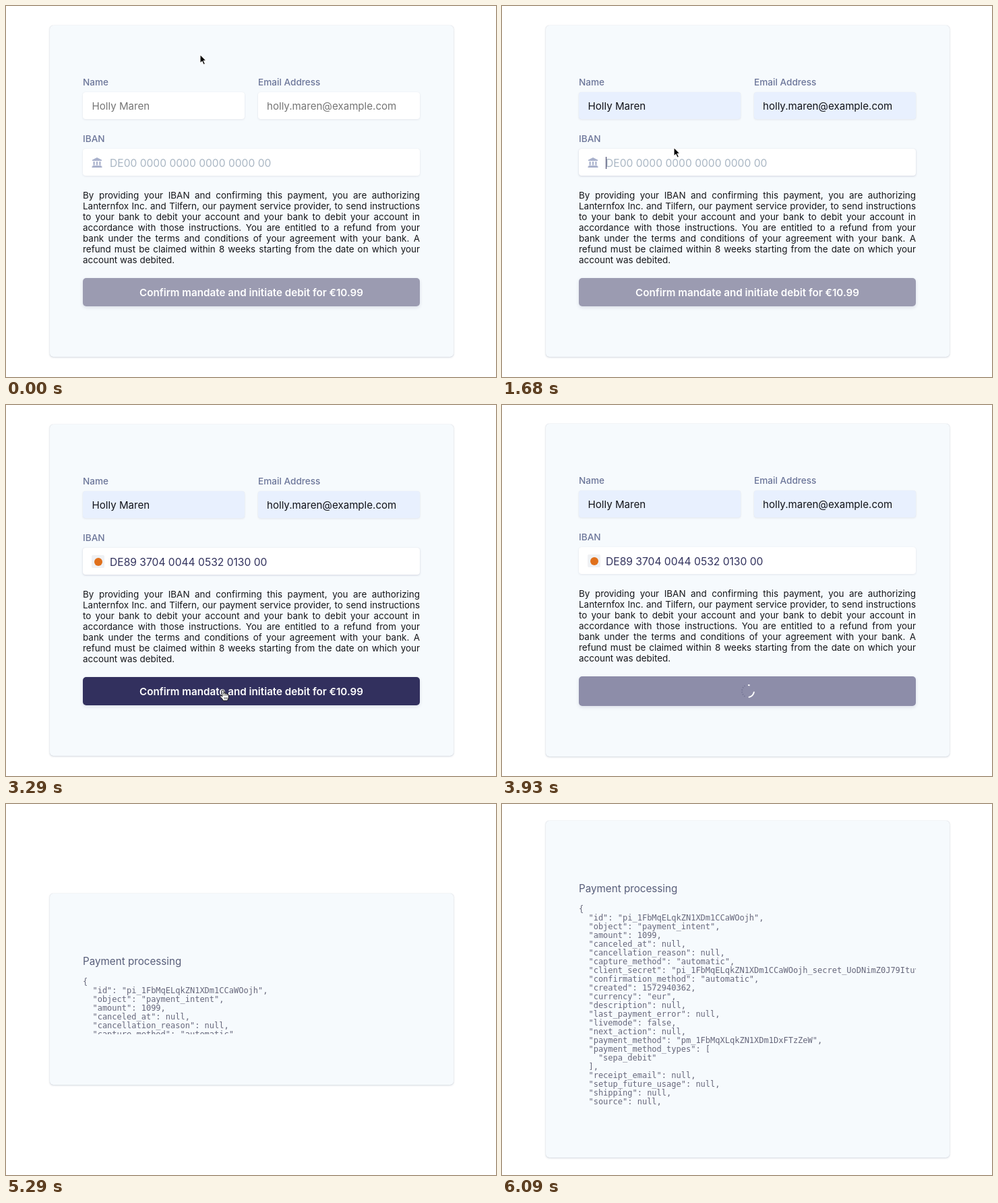
Recreate the animation shown at these times as an HTML page. Size 727 by 551 pixels, loop 8.75 s.

```html
<!DOCTYPE html>
<html lang="en">
<head>
<meta charset="utf-8">
<title>Direct debit form</title>
<style>
html, body { margin: 0; width: 100%; height: 100%; overflow: hidden; background: #fff; }
body { position: relative; font-family: Inter, "Open Sans", sans-serif; }
div, svg { position: absolute; }
.card { left: 65px; width: 599px; background: #f6fafd; border-radius: 5px;
  box-shadow: 0 0 1px rgba(60,80,110,.28), 0 1px 3px rgba(60,80,110,.2); }
.text { line-height: 20px; white-space: nowrap; }
.label { font-size: 13.6px; font-weight: 500; color: #6b7599; }
.value { font-size: 15.1px; }
.iban { font-size: 15.6px; }
.field { height: 40px; background: #fff; border-radius: 4px;
  box-shadow: 0 1px 3px rgba(50,50,93,.09), 0 0 1px rgba(50,50,93,.08); }
.legal { left: 114px; width: 500px; font-size: 13.45px; color: #15161a;
  text-align: justify; text-align-last: justify; }
.legal.last { text-align-last: left; }
#button { left: 114px; width: 500px; border-radius: 5px; box-shadow: 0 2px 5px rgba(50,50,93,.13); }
#pay { left: 114px; width: 500px; text-align: center; font-size: 15.2px; font-weight: 600; color: #fff; }
#panel { left: 114px; top: 170px; width: 241px; height: 116px; background: #fff;
  border-radius: 3px; box-shadow: 0 1px 3px rgba(0,0,0,.25); }
#row { left: 1px; top: 6px; width: 239px; height: 60px; }
#result { left: 114px; width: 500px; overflow: hidden; }
#result .head { top: 16px; font-size: 15.2px; color: #575d79; }
#json { position: absolute; left: 0; top: 49.5px; margin: 0; color: #66677b;
  font: 12px/13px "DejaVu Sans Mono", monospace; }
#caret { left: 154px; top: 224px; width: 1px; height: 18px; background: #32325d; }
</style>
</head>
<body>
<div id="card" class="card"></div>
<div id="form"></div>
<div id="button"></div>
<div id="pay" class="text" style="top:415.5px">Confirm mandate and initiate debit for €10.99</div>
<svg id="spinner" style="left:353px;top:413px" width="24" height="24" fill="none" stroke-width="2">
  <path id="rest" stroke="rgba(70,70,110,.3)" stroke-dasharray="1.5 2"/>
  <path id="lead" stroke="#fff"/>
  <path id="tail" stroke="#fff"/>
</svg>
<div id="panel">
  <div id="row"></div>
  <div class="text value" style="left:13px;top:14px;color:#222">Holly Maren</div>
  <div class="text" style="left:13px;top:36px;font-size:12px;color:#777">holly.maren@example.com</div>
</div>
<div id="result">
  <div class="text head">Payment processing</div>
  <pre id="json"></pre>
</div>
<svg id="arrow" width="14" height="20" viewBox="-2 -2 14 20">
  <path d="M0 0V13L3 10.3 5.2 15.3 7.5 14.3 5.3 9.4H9.2Z" fill="#000" stroke="#fff" stroke-width="1.1"/>
</svg>
<svg id="beam" width="9" height="19" fill="none" stroke="#222">
  <path d="M1 1.5Q4.5 1.5 4.5 4V15Q4.5 17.5 1 17.5M8 1.5Q4.5 1.5 4.5 4M8 17.5Q4.5 17.5 4.5 15"/>
</svg>
<svg id="hand" width="18" height="20" viewBox="-5 -2 18 20">
  <path d="M-1 1.2Q-1-.7.6-.7T2.2 1V5Q3-.1 4.8 5.2 6 3.8 7 5.7 9 4.8 9.2 7V11L7.6 15H1.3Q-.2 11.8-3 9.4-3.8 7.5-1.9 7.6L0 9Z" fill="#fff" stroke="#111" stroke-width="1"/>
  <path d="M2.3 5V8M4.8 5.4V8M7 6V8M3.1 10V13M5 10V13M6.9 10V13" stroke="#111" stroke-width=".7"/>
</svg>
<script>
const $ = id => document.getElementById(id);
const LOOP = 8750, OPEN = 640, FILL = 960, ACCEPT = 1360, IBAN_FOCUS = 1680, PASTE = 2570,
      RETURN = 3130, SUBMIT = 3770, READY = 4730, RESULT = 4970, EXPAND = 5083, GROW = 1040;

function add(parent, cls, x, cy, text) {
  const el = document.createElement("div");
  el.className = "text " + cls;
  el.style.left = x + "px";
  el.style.top = cy - 10 + "px";
  el.textContent = text;
  return parent.appendChild(el);
}
function field(x, y, w) {
  const el = document.createElement("div");
  el.className = "field";
  Object.assign(el.style, { left: x + "px", top: y + "px", width: w + "px" });
  return form.appendChild(el);
}

const form = $("form"), card = $("card"), button = $("button"), result = $("result");
add(form, "label", 114, 112.5, "Name");
add(form, "label", 374, 112.5, "Email Address");
add(form, "label", 114, 196.5, "IBAN");
const boxes = [field(114, 128, 240), field(374, 128, 240)];
const ibanBox = field(114, 212, 500);
const values = [add(form, "value", 127.5, 149, "Holly Maren"),
                add(form, "value", 387, 149, "holly.maren@example.com")];
const iban = add(form, "iban", 154, 233.5, "");
form.insertAdjacentHTML("beforeend", `
  <svg id="bank" style="left:127px;top:225px" width="16" height="16" fill="#a9b1cc">
    <path d="M8 0 15 3.6V5H1V3.6ZM2.5 6H4.7V11.5H2.5ZM6.9 6H9.1V11.5H6.9ZM11.3 6H13.5V11.5H11.3ZM1.5 12H14.5V13.3H15.5V15H.5V13.3H1.5Z"/>
  </svg>
  <svg id="badge" style="left:127px;top:223px" width="20" height="20">
    <rect width="19" height="19" rx="2" fill="#eff1f4"/><circle cx="10" cy="10" r="6" fill="#e0701c"/>
  </svg>
  <div id="caret"></div>`);

const legal = [
  "By providing your IBAN and confirming this payment, you are authorizing",
  "Lanternfox Inc. and Tilfern, our payment service provider, to send instructions",
  "to your bank to debit your account and your bank to debit your account in",
  "accordance with those instructions. You are entitled to a refund from your",
  "bank under the terms and conditions of your agreement with your bank. A",
  "refund must be claimed within 8 weeks starting from the date on which your",
  "account was debited."];
legal.forEach((s, i) => add(form, i < 6 ? "legal" : "legal last", 114, 280.5 + 16 * i, s));

$("json").textContent = JSON.stringify({
  id: "pi_1FbMqELqkZN1XDm1CCaWOojh",
  object: "payment_intent",
  amount: 1099,
  canceled_at: null,
  cancellation_reason: null,
  capture_method: "automatic",
  client_secret: "pi_1FbMqELqkZN1XDm1CCaWOojh_secret_UoDNimZ0J79ItuvKq",
  confirmation_method: "automatic",
  created: 1572940362,
  currency: "eur",
  description: null,
  last_payment_error: null,
  livemode: false,
  next_action: null,
  payment_method: "pm_1FbMqXLqkZN1XDm1DxFTzZeW",
  payment_method_types: ["sepa_debit"],
  receipt_email: null,
  setup_future_usage: null,
  shipping: null,
  source: null
}, null, 2).replace(/\n}$/, ",");

// Pointer path: time, x, y
const path = [[0, 288, 72], [720, 232, 148], [800, 232, 148], [1200, 216, 200], [1280, 216, 200],
  [1520, 255, 210], [1680, 255, 210], [2000, 263, 233], [3050, 263, 233], [3290, 321, 424], [LOOP, 321, 424]];

const clamp = x => Math.max(0, Math.min(1, x));
const smooth = x => x * x * (3 - 2 * x);
const mix = (a, b, p) => `rgb(${a.map((v, i) => Math.round(v + (b[i] - v) * p))})`;
const show = (el, on) => { el.style.display = on ? "" : "none"; };

// CSS "ease" curve: cubic-bezier(.25, .1, .25, 1)
function ease(x) {
  x = clamp(x);
  let lo = 0, hi = 1;
  for (let i = 0; i < 24; i++) {
    const s = (lo + hi) / 2, r = 1 - s;
    if (.75 * s * r * r + .75 * s * s * r + s ** 3 < x) lo = s; else hi = s;
  }
  return .3 * lo * (1 - lo) ** 2 + 3 * lo * lo * (1 - lo) + lo ** 3;
}

function arc(el, from, to) {
  const pt = a => {
    const r = a * Math.PI / 180;
    return `${12 + 9 * Math.cos(r)} ${12 + 9 * Math.sin(r)}`;
  };
  el.setAttribute("d", to > from ? `M${pt(from)}A9 9 0 0 1 ${pt(to)}` : "");
}

function place(el, x, y) {
  el.style.left = x + "px";
  el.style.top = y + "px";
}

function drawPointer(t) {
  const i = path.findIndex((p, k) => k && t < p[0]);
  const [a, b] = [path[i - 1], path[i]];
  const p = smooth((t - a[0]) / (b[0] - a[0]));
  const x = a[1] + (b[1] - a[1]) * p, y = a[2] + (b[2] - a[2]) * p;
  const overField = y > 128 && y < 168 || t > IBAN_FOCUS && y > 212 && y < 252;
  const kind = y > 404 ? "hand" : overField ? "beam" : "arrow";
  // Typing hides the pointer until it moves again
  const visible = t < PASTE || t >= RETURN && t < SUBMIT;
  for (const id of ["arrow", "beam", "hand"]) show($(id), id === kind && visible);
  place($("arrow"), x - 2, y - 2);
  place($("beam"), x - 4.5, y - 9.5);
  place($("hand"), x - 5, y - 2);
}

function drawButton(t, busy) {
  const dark = [50, 48, 94], off = [155, 155, 177], loading = [141, 141, 169];
  const fade = from => ease((t - from + 60) / 200);
  button.style.top = busy ? "403px" : "404px";
  button.style.height = busy ? "44px" : "42px";
  button.style.background =
    t < PASTE ? mix(off, off, 0) :
    t < SUBMIT ? mix(off, dark, fade(PASTE)) :
    t < READY ? mix(dark, loading, fade(SUBMIT)) : mix(loading, dark, fade(READY));
  show($("pay"), !busy);
  show($("spinner"), busy);
  const turn = Math.min(180, 360 * ease((t - 3800) / 2000));
  arc($("rest"), 120, 240);
  arc($("lead"), -90, -90 + turn);
  arc($("tail"), Math.max(5, -90 + turn), 85);
}

function drawForm(t, busy) {
  const pasted = t >= PASTE;
  form.style.top = busy ? "-1px" : "0";
  boxes.forEach(b => { b.style.background = t >= FILL ? "#e8f0fe" : "#fff"; });
  values.forEach(v => { v.style.color = t >= ACCEPT ? "#111318" : "#757575"; });
  ibanBox.style.boxShadow = t >= IBAN_FOCUS && t < SUBMIT
    ? "0 1px 3px rgba(50,50,93,.18), 0 0 1px rgba(50,50,93,.1)" : "";
  iban.textContent = pasted ? "DE89 3704 0044 0532 0130 00" : "DE00 0000 0000 0000 0000 00";
  iban.style.color = pasted ? "#32325d" : "#aab7c4";
  show($("bank"), !pasted);
  show($("badge"), pasted);
  show($("caret"), t >= IBAN_FOCUS && t < 2000 || t >= 2410 && !pasted);
  show($("panel"), t >= OPEN && t < ACCEPT);
  $("row").style.background = t >= FILL ? "#ececee" : "none";
  drawButton(t, busy);
}

function draw(now) {
  const raw = now % LOOP;
  // The picture advances in steps of 80 ms
  const t = raw < 2410 ? Math.floor(raw / 80) * 80 : Math.floor((raw - 10) / 80) * 80 + 10;
  const done = t >= RESULT, busy = t >= SUBMIT && t < READY;
  for (const el of [form, button, $("pay"), $("spinner"), $("panel")]) show(el, !done);
  show(result, done);
  drawPointer(t);
  let height = busy ? 494 : 492;
  if (done) {
    const h = 44 + 306 * ease((t - EXPAND) / GROW);
    height = h + 150;
    result.style.top = 275 - h / 2 + "px";
    result.style.height = h + "px";
  } else drawForm(t, busy);
  card.style.top = 275 - height / 2 + "px";
  card.style.height = height + "px";
}

const start = performance.now();
function tick() {
  draw(performance.now() - start);
  requestAnimationFrame(tick);
}
tick();
</script>
</body>
</html>
```
